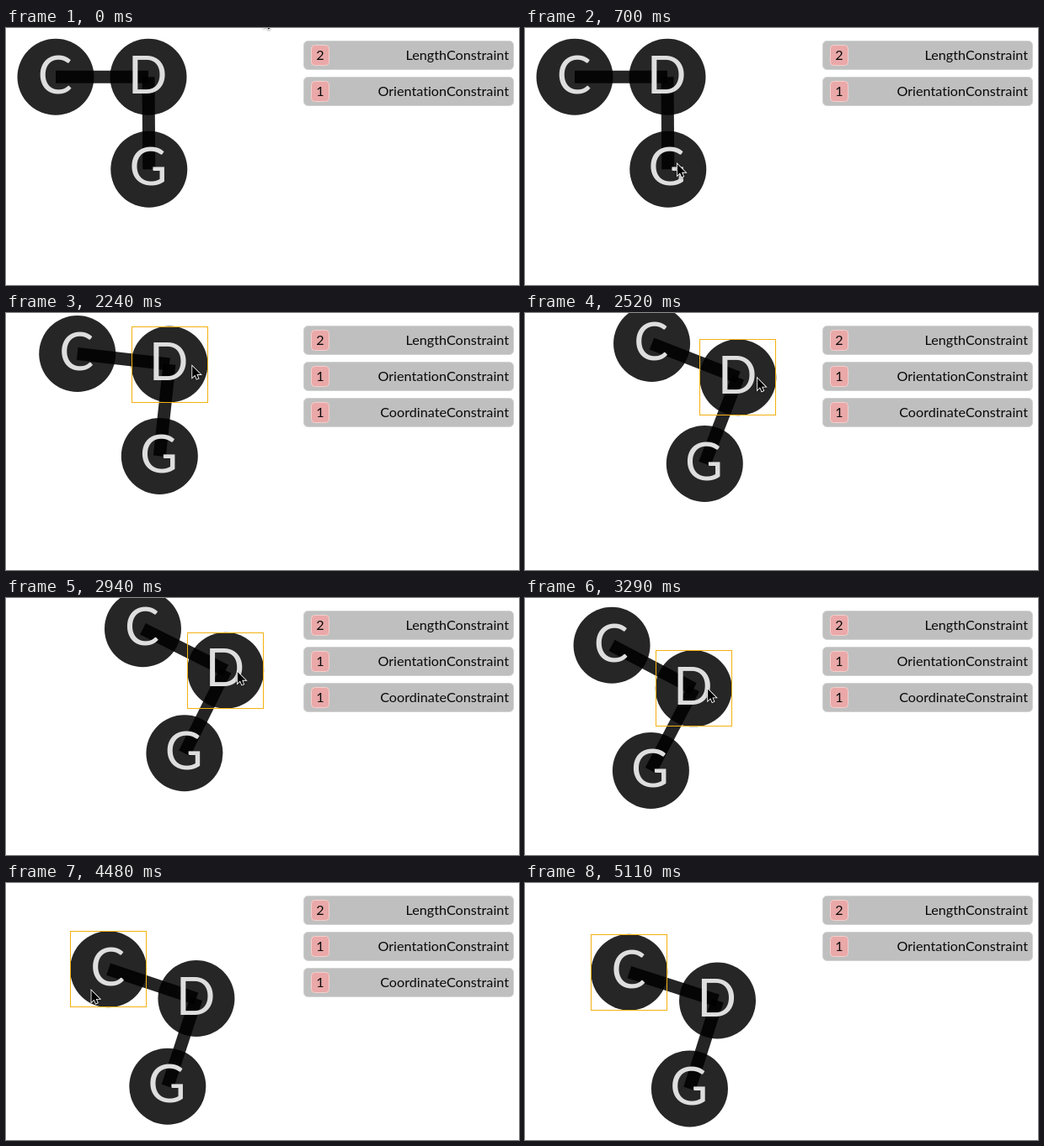
An HTML page for the animation above (5320 ms loop, 609 by 306 pixels).

```html
<!DOCTYPE html>
<html lang="en">
<head>
<meta charset="utf-8">
<title>Constraint dragging</title>
<style>
  html, body { margin: 0; width: 100%; height: 100%; overflow: hidden; background: #fff; }
  svg { display: block; width: 609px; height: 306px; font-family: Lato, "Open Sans", sans-serif;
        font-variant-ligatures: none; }
  .panel { fill: #bfbfbf; stroke: #d0d4d2; }
  .badge { fill: #eaa8a8; stroke: #f3d0cc; }
  .row text { font-size: 16.2px; fill: #0a0a0a; }
  .node { fill: #000; fill-opacity: .85; }
  .edge { stroke: #000; stroke-opacity: .86; stroke-width: 15; }
  .letter { font-size: 61.5px; fill: #dedede; text-anchor: middle; }
  .selection { fill: none; stroke: #f4b010; }
  .cursor { fill: #000; stroke: #fff; stroke-width: 2; paint-order: stroke;
            filter: drop-shadow(0 1px 1px rgba(0, 0, 0, .4)); }
</style>
</head>
<body>
<svg id="stage" viewBox="0 0 609 306"></svg>
<script>
const LOOP = 5320, STEP = 70, RADIUS = 45.5, ARM = 110;
const GRAB_D = 1960, DROP_D = 3430, GRAB_C = 4060, DROP_C = 4620;
const stage = document.getElementById('stage');

function add(tag, attrs, parent = stage, text = '') {
  const el = document.createElementNS('http://www.w3.org/2000/svg', tag);
  set(el, attrs);
  el.textContent = text;
  return parent.appendChild(el);
}
function set(el, attrs) {
  for (const name in attrs) el.setAttribute(name, attrs[name]);
}
function show(el, visible) {
  el.style.display = visible ? '' : 'none';
}

const linear = k => k;
const easeIn = k => k * k;
const easeOut = k => k * (2 - k);
const easeInOut = k => k * k * (3 - 2 * k);

// Runs through the moves in order; each holds its end until the next begins.
function follow(from, moves, t) {
  return moves.reduce((value, { start, end, ease, to }) => {
    const k = ease(Math.min(Math.max((t - start) / (end - start), 0), 1));
    return value.map((v, i) => v + (to[i] - v) * k);
  }, from);
}
const move = (start, end, ease, ...to) => ({ start, end, ease, to });

// x and y of node D, then the turn of the whole figure in degrees
const figureStart = [169, 58.3, 0];
const figureMoves = [
  move(GRAB_D, 2240, easeIn, 194, 61, 6.5),
  move(2240, 2800, easeOut, 272.5, 82, 26.5),
  move(2800, 3360, easeInOut, 197, 109, 28),
  move(GRAB_C, 4130, linear, 197, 110.3, 24.8),
  move(4130, DROP_C, easeOut, 228.5, 140, 17.9)
];

const cursorStart = [306, -15];
const cursorMoves = [
  move(210, 630, easeInOut, 177, 178),
  move(630, 910, easeInOut, 201.5, 69),
  move(1330, 1540, linear, 231, 68),
  move(1680, GRAB_D, easeInOut, 188, 57),
  move(GRAB_D, DROP_D, linear, 216, 108),
  move(DROP_D, 3990, easeInOut, 79, 81),
  move(GRAB_C, DROP_C, easeOut, 103, 129),
  move(DROP_C + STEP, 5110, linear, 262, -36)
];

function figure(t) {
  const [x, y, turn] = follow(figureStart, figureMoves, t);
  const c = turn * Math.PI / 180, g = c - .007;
  return [
    [x - ARM * Math.cos(c), y - ARM * Math.sin(c)],
    [x, y],
    [x - ARM * Math.sin(g), y + ARM * Math.cos(g)]
  ];
}

// A dragged node trails slightly behind the pointer.
function pointer(t) {
  const ahead = figure(t + 30);
  if (t >= GRAB_D && t < DROP_D) return [ahead[1][0] + 19, ahead[1][1] - 1];
  if (t >= GRAB_C && t < DROP_C) return [ahead[0][0] - 21, ahead[0][1] + 23];
  return follow(cursorStart, cursorMoves, t);
}

function makeRow(index, count, label) {
  const row = add('g', { class: 'row', transform: `translate(0 ${index * 43})` });
  add('rect', { class: 'panel', x: 353.5, y: 15.5, width: 249, height: 34, rx: 5 }, row);
  add('rect', { class: 'badge', x: 362.5, y: 20.5, width: 21, height: 24, rx: 4 }, row);
  add('text', { x: 373, y: 38, 'text-anchor': 'middle' }, row, count);
  add('text', { x: 597, y: 38, 'text-anchor': 'end' }, row, label);
  return row;
}

makeRow(0, 2, 'LengthConstraint');
makeRow(1, 1, 'OrientationConstraint');
const dragRow = makeRow(2, 1, 'CoordinateConstraint');

const names = ['C', 'D', 'G'];
const nodes = names.map(() => add('circle', { class: 'node', r: RADIUS }));
const edges = [0, 2].map(end => ({ end, line: add('line', { class: 'edge' }) }));
const letters = names.map(name => add('text', { class: 'letter' }, stage, name));
const selection = add('rect', { class: 'selection', width: 90, height: 90 });
const cursor = add('path', {
  class: 'cursor',
  d: 'M0 0V16L3.7 12.5L6.2 18.2L8.6 17.1L6.2 11.6H11.5Z'
});

function draw(t) {
  const points = figure(t);
  const [x, y] = points[1];
  points.forEach(([px, py], i) => {
    set(nodes[i], { cx: px, cy: py });
    set(letters[i], { x: px - .8, y: py + 19.2 });
  });
  for (const { end, line } of edges) {
    set(line, { x1: points[end][0], y1: points[end][1], x2: x, y2: y });
  }

  const selected = points[t < GRAB_C ? 1 : 0];
  const snap = v => Math.round(v - RADIUS) + .5;
  set(selection, { x: snap(selected[0]), y: snap(selected[1]) });
  show(selection, t > GRAB_D);
  show(dragRow, (t > GRAB_D && t <= DROP_D) || (t >= GRAB_C && t <= DROP_C));

  const [tipX, tipY] = pointer(t);
  set(cursor, { transform: `translate(${tipX} ${tipY + 1}) scale(.85)` });
}

const start = performance.now();
function tick() {
  const t = (performance.now() - start) % LOOP;
  draw(Math.floor(t / STEP) * STEP);
  requestAnimationFrame(tick);
}
tick();
</script>
</body>
</html>
```
